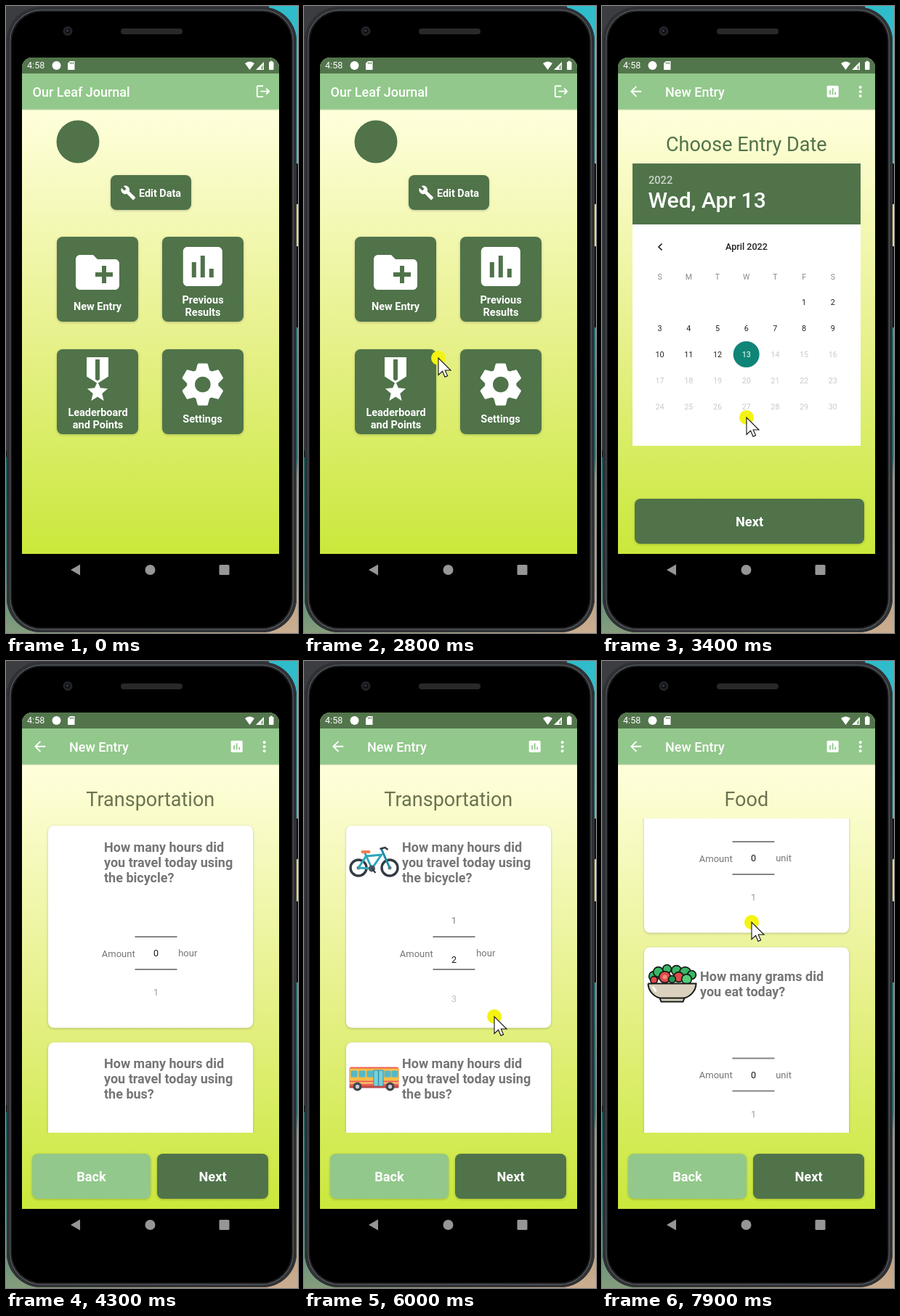
An HTML page with a canvas that plays this animation: 402x864 px, repeating every 8 s.

```html
<!DOCTYPE html>
<html lang="en">
<head>
<meta charset="utf-8">
<title>Our Leaf Journal</title>
<style>
html, body { margin: 0; width: 100%; height: 100%; overflow: hidden; background: #000; }
canvas { display: block; width: 402px; height: 864px; }
</style>
</head>
<body>
<canvas id="stage"></canvas>
<script>
const W = 402, H = 864, LOOP = 8000, STEP = 100;
const GREEN = '#50734a', LIGHT = '#92c88b', GREY = '#757575';
const canvas = document.getElementById('stage');
const dpr = window.devicePixelRatio || 1;
canvas.width = W * dpr;
canvas.height = H * dpr;
const c = canvas.getContext('2d');

const ICONS = {
  folder: 'M20 6h-8l-2-2H4c-1.1 0-2 .9-2 2v12c0 1.1.9 2 2 2h16c1.1 0 2-.9 2-2V8c0-1.1-.9-2-2-2zm-1 8h-3v3h-2v-3h-3v-2h3V9h2v3h3z',
  chart: 'M19 3H5c-1.1 0-2 .9-2 2v14c0 1.1.9 2 2 2h14c1.1 0 2-.9 2-2V5c0-1.1-.9-2-2-2zM9 17H7v-7h2zm4 0h-2V7h2zm4 0h-2v-4h2z',
  wrench: 'M22.7 19l-9.1-9.1c.9-2.3.4-5-1.5-6.9-2-2-5-2.4-7.4-1.3L9 6 6 9 1.6 4.7C.4 7.1.9 10.1 2.9 12.1c1.9 1.9 4.6 2.4 6.9 1.5l9.1 9.1c.4.4 1 .4 1.4 0l2.3-2.3c.5-.4.5-1.1.1-1.4z',
  exit: 'M17 7l-1.4 1.4L18.2 11H8v2h10.2l-2.6 2.6L17 17l5-5zM4 5h8V3H4c-1.1 0-2 .9-2 2v14c0 1.1.9 2 2 2h8v-2H4z',
  medal: 'M17 10.8V2H7v8.8l4.7 3-1 2.3-3.4.3 2.6 2.3L9.1 22l2.9-1.8 2.9 1.8-.8-3.3 2.6-2.3-3.4-.3-1-2.3zM11 3h2v9.2l-1 .6-1-.6z',
  back: 'M20 11H7.8l5.6-5.6L12 4l-8 8 8 8 1.4-1.4L7.8 13H20z',
  arrow: 'M0 0V23.5L5.6 18.3 9 26.2 12.6 24.6 9.2 17H17z'
};
for (const k in ICONS) ICONS[k] = new Path2D(ICONS[k]);

function icon(name, x, y, scale, color = '#fff') {
  c.save();
  c.translate(x, y);
  c.scale(scale, scale);
  c.fillStyle = color;
  c.fill(ICONS[name], 'evenodd');
  c.restore();
}

function box(x, y, w, h, r, fill, shadow) {
  c.save();
  if (shadow) {
    c.shadowColor = 'rgba(0,0,0,.22)';
    c.shadowBlur = 3.5 * dpr;
    c.shadowOffsetY = dpr;
  }
  c.fillStyle = fill;
  c.beginPath();
  c.roundRect(x, y, w, h, r);
  c.fill();
  c.restore();
}

function frame(x, y, w, h, r, color, width) {
  c.strokeStyle = color;
  c.lineWidth = width;
  c.beginPath();
  c.roundRect(x, y, w, h, r);
  c.stroke();
}

function dot(x, y, r, fill) {
  c.fillStyle = fill;
  c.beginPath();
  c.arc(x, y, r, 0, 7);
  c.fill();
}

function poly(points, fill) {
  c.fillStyle = fill;
  c.beginPath();
  points.forEach(p => c.lineTo(...p));
  c.fill();
}

function line(points, color, width) {
  c.strokeStyle = color;
  c.lineWidth = width;
  c.beginPath();
  points.forEach(p => c.lineTo(...p));
  c.stroke();
}

// y is the middle of the capitals
function text(s, x, y, size, color, weight = 400, align = 'left') {
  c.font = `${weight} ${size}px Roboto, sans-serif`;
  c.fillStyle = color;
  c.textAlign = align;
  c.fillText(s, x, y + size * 0.355);
}

function fade(x0, y0, x1, y1, ...stops) {
  const g = c.createLinearGradient(x0, y0, x1, y1);
  stops.forEach(([at, color]) => g.addColorStop(at, color));
  return g;
}

function phone() {
  box(0, 0, W, H, 0, '#3b3d40');
  box(0, 612, 40, 252, 0, fade(0, 612, 0, H, [0, '#12696b'], [.6, '#3f8580'], [1, '#869d7c']));
  box(362, 0, 40, H, 0, fade(0, 0, 0, H, [0, '#2fbccb'], [.31, '#4fc0c4'], [.32, '#ecd67e'], [.4, '#ecd67e'],
    [.5, '#12a5b3'], [.72, '#148d98'], [.75, '#8f9a84'], [.93, '#b9a17f'], [1, '#cbae90']));
  box(40, 860, 322, 4, 0, fade(40, 0, 362, 0, [0, '#869d7c'], [1, '#cbae90']));
  box(398, 217, 4, 56, 1, '#101113');
  box(398, 331, 4, 112, 1, '#101113');
  box(0, 612, 3, 10, 1, '#101113');
  box(1, 1.5, 399, 861.5, 47, '#1b1c1e');
  frame(2.5, 3, 396, 858.5, 46, '#303236', 3);
  frame(5.5, 5.5, 390, 853.5, 43, '#54575b', 1.5);
  box(8, 8, 385, 848.5, 41, '#000');
  box(158, 31, 85, 8, 4, '#29292b');
  dot(85, 34.5, 6.5, '#222427');
  dot(85, 34.5, 3.5, '#0e1014');
  dot(84.5, 34, 1.5, '#39424d');
  poly([[89, 777], [102, 769.5], [102, 784.5]], '#969696');
  dot(198.5, 777, 7, '#969696');
  box(293.5, 770, 14, 14, 1.5, '#969696');
}

function screen() {
  box(22, 71, 354, 684, [14, 14, 0, 0], fade(0, 143, 0, 755, [0, '#ffffdc'], [.5, '#e8f18e'], [1, '#cae83b']));
  box(22, 92.5, 354, 50, 0, LIGHT);
  box(22, 142.5, 354, 2, 0, fade(0, 142.5, 0, 144.5, [0, 'rgba(80,110,60,.25)'], [1, 'rgba(80,110,60,0)']));
  box(22, 71, 354, 22, [14, 14, 0, 0], '#52754b');
  text('4:58', 29, 82, 12.6, '#fff');
  dot(69.5, 82, 6, '#fff');
  poly([[88, 76], [94.5, 76], [94.5, 88], [85, 88], [85, 79]], '#fff');
  for (const x of [88, 90, 92]) box(x, 77.5, 1, 2.5, 0, '#52754b');
  c.fillStyle = '#fff';
  c.beginPath();
  c.moveTo(335.5, 88);
  c.lineTo(329, 79);
  c.quadraticCurveTo(335.5, 74, 342, 79);
  c.fill();
  poly([[344, 88], [355, 77], [355, 88]], '#fff');
  poly([[351, 84], [354, 81], [354, 87], [351, 87]], '#9db596');
  box(362, 77, 6.5, 11, 1, '#fff');
  box(363.7, 75.7, 3, 2, 0, '#fff');
}

function gear(x, y) {
  c.save();
  c.translate(x, y);
  c.fillStyle = '#fff';
  c.beginPath();
  c.arc(0, 0, 21.6, 0, 7);
  c.fill();
  for (let i = 0; i < 6; i++) {
    c.beginPath();
    c.moveTo(-10, -17);
    c.lineTo(-7.2, -27.5);
    c.quadraticCurveTo(-7, -29, -5.5, -29);
    c.lineTo(5.5, -29);
    c.quadraticCurveTo(7, -29, 7.2, -27.5);
    c.lineTo(10, -17);
    c.fill();
    c.rotate(Math.PI / 3);
  }
  c.restore();
  dot(x, y, 10.8, GREEN);
}

function home() {
  text('Our Leaf Journal', 36.5, 118.5, 18, '#fff', 500);
  icon('exit', 343, 106.5, .93);
  dot(99, 187, 29.5, GREEN);
  box(144, 233, 111, 48, 8, GREEN, true);
  icon('wrench', 157.5, 246.5, .9);
  text('Edit Data', 183, 257.5, 14.4, '#fff', 700);
  for (const x of [70, 215]) for (const y of [318, 473]) box(x, y, 112, 117, 8, GREEN, true);
  icon('folder', 90, 331, 3);
  icon('chart', 234.8, 323, 3);
  icon('medal', 90, 478, 3);
  gear(270.8, 521.5);
  const label = (s, x, y) => text(s, x, y, 14.5, '#fff', 700, 'center');
  label('New Entry', 126, 413.5);
  label('Previous', 271, 405);
  label('Results', 271, 422);
  label('Leaderboard', 126.5, 560);
  label('and Points', 126.5, 577);
  label('Settings', 270.5, 568.5);
}

function entryBar(title, color) {
  icon('back', 35.3, 106.4, .95);
  text('New Entry', 87, 118.5, 18, '#fff', 500);
  icon('chart', 307, 107, .89);
  for (const y of [112, 118, 124]) dot(355.7, y, 2, '#fff');
  text(title, 198.8, 190.5, 27, color, 400, 'center');
}

function button(s, x, w, fill) {
  box(x, 679, w, 62, 8, fill, true);
  text(s, x + w / 2, 710.5, 18.2, '#fff', 700, 'center');
}

function calendar() {
  entryBar('Choose Entry Date', '#50734a');
  box(42, 217, 314, 84, 0, GREEN);
  text('2022', 64, 240, 14.6, 'rgba(255,255,255,.7)', 500);
  text('Wed, Apr 13', 63.5, 267, 30.2, '#fff', 500);
  box(42, 301, 314, 305, 0, '#fff');
  line([[82.5, 327.5], [78, 332], [82.5, 336.5]], '#222', 1.7);
  text('April 2022', 199, 332, 12.6, '#222', 500, 'center');
  const col = i => 79.6 + i * 39.7;
  [...'SMTWTFS'].forEach((d, i) => text(d, col(i), 373, 10.6, '#8a8a8a', 400, 'center'));
  dot(198.7, 480, 18, '#0f8577');
  for (let d = 1; d <= 30; d++) {
    const at = d + 4, y = 408 + Math.floor(at / 7) * 36;
    text(d, col(at % 7), y, 10.8, d < 13 ? '#222' : d > 13 ? '#cacaca' : '#fff', 400, 'center');
  }
  button('Next', 45, 316, GREEN);
}

// Pictures are drawn around (0, 0)
function bicycle() {
  for (const x of [-21.5, 21.5]) {
    c.lineWidth = 3.4;
    c.strokeStyle = '#353b44';
    c.beginPath();
    c.arc(x, 8, 11, 0, 7);
    c.stroke();
    dot(x, 8, 2.5, '#6c7680');
  }
  line([[-21.5, 8], [-11, -8], [10, -10], [-3, 9], [-21.5, 8]], '#2ba7bd', 3);
  line([[-3, 9], [-13, -13]], '#2ba7bd', 3);
  line([[21.5, 8], [10, -18]], '#1d8ca6', 3);
  line([[8, -18], [15, -20], [19, -17]], '#353b44', 2.5);
  box(-18, -16, 13, 4, 2, '#ef7d55');
  dot(-3, 9, 4.5, '#4b535d');
  line([[-3, 9], [2, 15]], '#353b44', 2);
}

function bus() {
  box(-34, -16, 68, 28, 3, '#ee5f55');
  box(-34, -14, 68, 17, 2, '#f8bd48');
  for (const x of [-32, -21, -10, 14, 24]) box(x, -11, 9, 9, 1, '#55b8c8');
  box(-34, 5, 68, 2, 0, '#f7d174');
  box(-1, -12, 14, 24, 1, '#318fa4');
  for (const x of [0, 6.7]) box(x, -11, 5.3, 22, 0, '#7cd0d9');
  box(-34, 10, 68, 3, 1, '#b94b49');
  for (const x of [-23, 22]) {
    dot(x, 11, 6, '#40454d');
    dot(x, 11, 2.7, '#c9ced2');
  }
}

function salad() {
  const leaf = (x, y, r, color) => {
    dot(x, y, r + 1.7, '#161a18');
    dot(x, y, r, color);
  };
  for (const [x, y, r] of [[-25, -10, 6], [-19, -16, 6], [-7, -20, 5], [6, -18, 6], [18, -15, 7], [27, -12, 5]])
    leaf(x, y, r, '#38b765');
  for (const [x, y, r] of [[-10, -9, 7], [9, -9, 6], [-25, -5, 4]]) leaf(x, y, r, '#dd4b4b');
  dot(-10, -9, 3, '#f28b79');
  leaf(20, -6, 6, '#50cf78');
  leaf(0, -6, 4, '#259653');
  c.fillStyle = '#d9d1be';
  c.strokeStyle = '#161a18';
  c.lineWidth = 2;
  c.beginPath();
  c.moveTo(-33, 0);
  c.lineTo(33, 0);
  c.bezierCurveTo(33, 11, 24, 18, 17, 20);
  c.lineTo(15, 25);
  c.lineTo(-15, 25);
  c.lineTo(-17, 20);
  c.bezierCurveTo(-24, 18, -33, 11, -33, 0);
  c.fill();
  c.stroke();
  line([[-17, 20], [17, 20]], '#161a18', 1.8);
  line([[-27, 4], [-22, 11]], '#fff', 3);
}

function egg() {
  c.fillStyle = '#f2d3aa';
  c.beginPath();
  c.ellipse(0, 0, 19, 25, 0, 0, 7);
  c.fill();
}

function picker(y, unit, offset, roll) {
  const x = 206.5 + offset;
  text('Amount', x - 28.8, y, 13, GREY, 400, 'right');
  text(unit, x + 30.7, y - .5, 13, GREY);
  for (const dy of [-23, 22]) line([[x - 29, y + dy], [x + 29, y + dy]], '#858585', 2);
  for (let n = 0; n < 6; n++) {
    const d = n * 54 - roll, a = Math.min(1, (80 - Math.abs(d)) / 62);
    if (a > 0) text(n, x, y + d, 12.6, `rgba(20,20,20,${a})`, 400, 'center');
  }
}

function card(y, lines, art, unit, offset, roll = 0) {
  box(58, y, 282, 278.5, 8, '#fff', true);
  lines.forEach((s, i) => text(s, 135, y + 50.3 + (i - (lines.length - 1) / 2) * 21, 18, GREY, 700));
  if (art) {
    c.save();
    c.translate(96.5, y + 50);
    art();
    c.restore();
  }
  picker(y + 176, unit, offset, roll);
}

function form(title, scroll, cards) {
  entryBar(title, '#6b7350');
  c.save();
  c.beginPath();
  c.rect(40, 217, 320, 433);
  c.clip();
  cards.forEach((args, i) => card(227 + i * 298.5 - scroll, ...args));
  c.restore();
  button('Back', 36, 163, LIGHT);
  button('Next', 208, 153, GREEN);
}

// Keys are [time, value, ...]; eased between neighbours
function track(keys, t) {
  let i = 0;
  while (i < keys.length - 2 && t >= keys[i + 1][0]) i++;
  const [a, b] = [keys[i], keys[i + 1]];
  const k = Math.max(0, Math.min(1, (t - a[0]) / (b[0] - a[0])));
  const e = k * k * (3 - 2 * k);
  return a.slice(1).map((v, n) => v + (b[n + 1] - v) * e);
}

const POINTER = [
  [900, 405, 520], [1400, 123, 376], [2000, 123, 376], [2500, 185, 485], [2900, 185, 485],
  [3400, 199, 567], [3800, 204, 705], [4600, 230, 700], [5000, 207, 452], [5100, 207, 452],
  [5600, 207, 362], [6000, 262, 490], [6600, 285, 706], [6800, 285, 706], [7300, 206, 491],
  [7400, 206, 491], [7900, 206, 360], [8000, 206, 360]
];
const ROLL = [[5100, 0], [5600, 72], [6000, 99], [6200, 108]];
const SCROLL = [[7400, 0], [7900, 131]];

function pointer(t) {
  if (t < 900 || (t >= 4000 && t < 4600)) return;
  const [x, y] = track(POINTER, t);
  c.save();
  dot(x, y, 10, '#f4f312');
  c.translate(x, y);
  c.fillStyle = '#fff';
  c.fill(ICONS.arrow);
  c.lineWidth = 1.1;
  c.strokeStyle = '#111';
  c.stroke(ICONS.arrow);
  c.restore();
}

function draw(t) {
  c.setTransform(dpr, 0, 0, dpr, 0, 0);
  phone();
  screen();
  const hours = 'How many hours did', using = 'you travel today using';
  if (t < 2900) home();
  else if (t < 4000) calendar();
  else if (t < 6800) {
    const loaded = t >= 4600;
    form('Transportation', 0, [
      [[hours, using, 'the bicycle?'], loaded && bicycle, 'hour', 0, track(ROLL, t)[0]],
      [[hours, using, 'the bus?'], loaded && bus, 'hour', 0]
    ]);
  } else {
    const loaded = t >= 7200;
    form('Food', track(SCROLL, t)[0], [
      [['How many eggs did', 'you eat today?'], loaded && egg, 'unit', 2],
      [['How many grams did', 'you eat today?'], loaded && salad, 'unit', 2]
    ]);
  }
  pointer(t);
}

const start = performance.now();
function tick() {
  const t = (performance.now() - start) % LOOP;
  draw(Math.floor(t / STEP) * STEP);
  requestAnimationFrame(tick);
}
tick();
</script>
</body>
</html>
```
